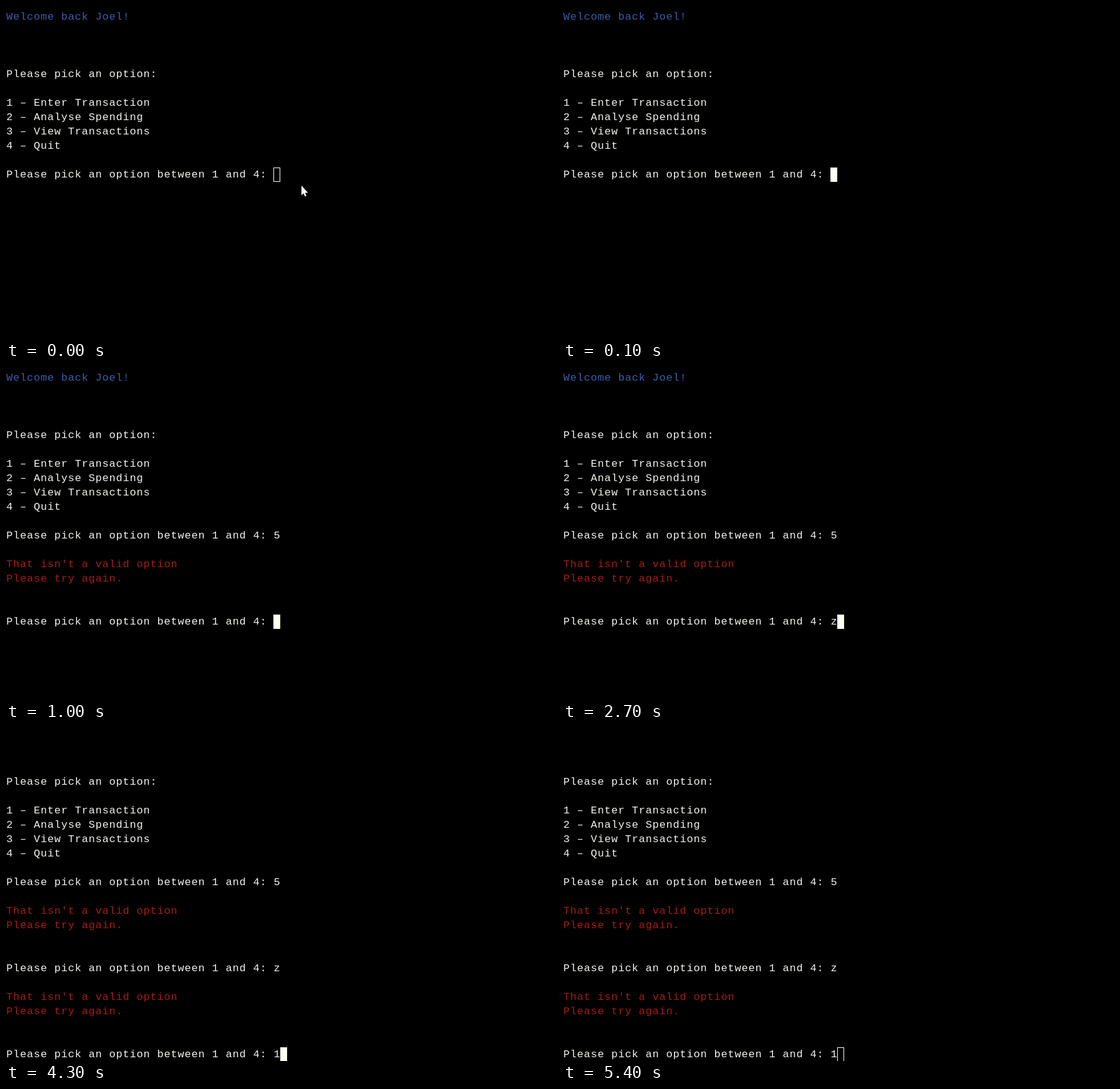
Write an HTML page with a canvas that moves like this. It is 884 by 534 pixels and loops after 5.6 s.

```html
<!DOCTYPE html>
<html lang="en">
<head>
<meta charset="utf-8">
<title>Spending menu</title>
<style>
html, body { margin: 0; width: 100%; height: 100%; overflow: hidden; background: #000; }
canvas { display: block; }
</style>
</head>
<body>
<canvas id="stage" width="884" height="534"></canvas>
<script>
const ctx = document.getElementById("stage").getContext("2d", { alpha: false });
const LOOP = 5600, CELL = 11, ROW = 23, TOP = 6, BASELINE = 16;
const FONT_SIZE = 17, GAP = CELL - FONT_SIZE * 0.6;
const WHITE = "#f4f4ee", CURSOR = "#fffff4", BLUE = "#3c5cac", RED = "#a81c12";
const PROMPT = "Please pick an option between 1 and 4: ";

const menu = [
  [0, "Welcome back Joel!", BLUE],
  [4, "Please pick an option:"],
  [6, "1 – Enter Transaction"],
  [7, "2 – Analyse Spending"],
  [8, "3 – View Transactions"],
  [9, "4 – Quit"],
];

// Each answer is typed at one time and, if invalid, rejected at another.
const prompts = [
  { row: 11, shown: 0, typed: 800, key: "5", rejected: 1000 },
  { row: 17, shown: 1000, typed: 2700, key: "z", rejected: 3400 },
  { row: 23, shown: 3400, typed: 4300, key: "1", rejected: Infinity },
];

function drawCursor(column, row, hollow) {
  const x = column * CELL, y = TOP + row * ROW;
  ctx.fillStyle = CURSOR;
  ctx.fillRect(x, y, CELL, ROW);
  if (hollow) {
    ctx.fillStyle = "#000";
    ctx.fillRect(x + 1, y + 1, CELL - 2, ROW - 2);
  }
}

function drawPointer() {
  ctx.fillStyle = "#fff";
  ctx.fill(new Path2D("M474 288V303.5L477.5 300.5L479.7 305.5L482 304.5L479.8 299.5H484.5Z"));
}

function draw(t) {
  const scroll = t >= 3400 ? 1 : 0;
  const write = (row, text, color = WHITE) => {
    ctx.fillStyle = color;
    ctx.fillText(text, GAP / 2, TOP + BASELINE + (row - scroll) * ROW);
  };

  ctx.fillStyle = "#000";
  ctx.fillRect(0, 0, 884, 534);
  ctx.font = `${FONT_SIZE}px "Liberation Mono", "Courier New", monospace`;
  ctx.letterSpacing = `${GAP}px`;
  menu.forEach(line => write(...line));

  for (const { row, shown, typed, key, rejected } of prompts) {
    if (t < shown) break;
    const text = PROMPT + (t >= typed ? key : "");
    write(row, text);
    if (t >= rejected) {
      write(row + 2, "That isn't a valid option", RED);
      write(row + 3, "Please try again.", RED);
    } else {
      drawCursor(text.length, row - scroll, t < 100 || t >= 5400);
    }
  }
  if (t < 100) drawPointer();
}

const start = performance.now();
function tick() {
  draw((performance.now() - start) % LOOP);
  requestAnimationFrame(tick);
}
tick();
</script>
</body>
</html>
```
